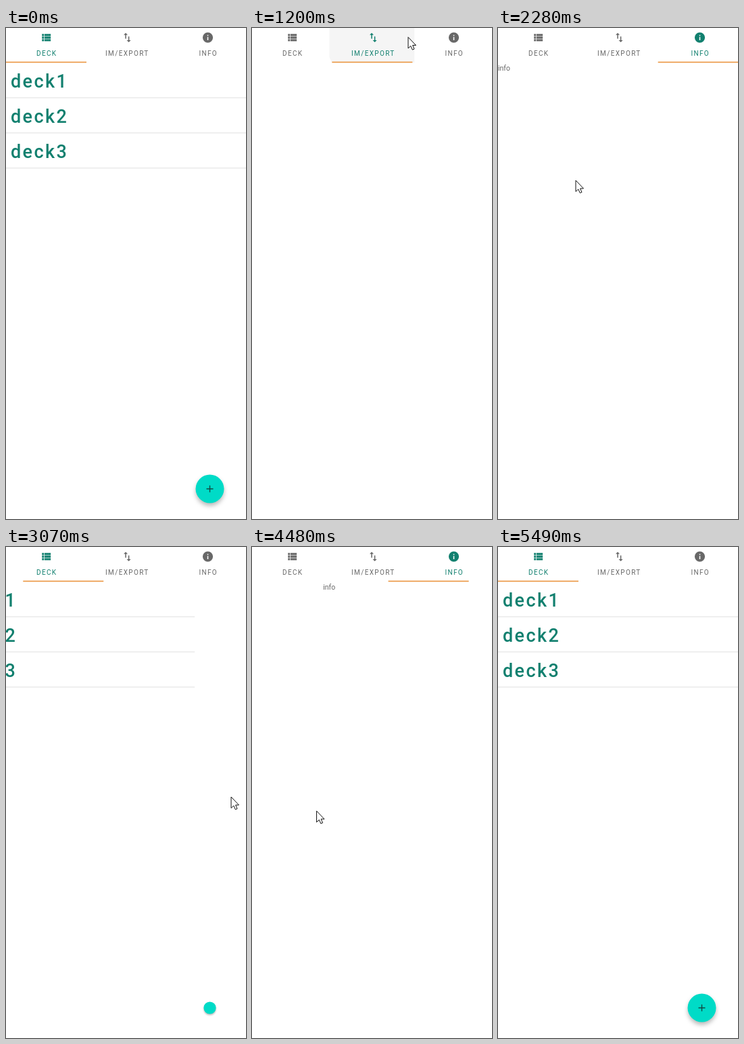
Recreate the animation shown at these times as an HTML page. Size 355x725 px, loop 6.35 s.

```html
<!DOCTYPE html>
<html lang="en">
<head>
<meta charset="utf-8">
<title>Deck tabs</title>
<style>
html, body { margin: 0; width: 100%; height: 100%; overflow: hidden; background: #fff; }
svg { display: block; width: 355px; height: 725px; font-family: Roboto, sans-serif; }
.tab { fill: #686868; font: 400 10px Roboto, sans-serif; letter-spacing: 1.35px; }
.tab.on { fill: #12806f; }
.deck { fill: #12806f; font: 500 27px Roboto, sans-serif; letter-spacing: 2.35px; }
#fab { filter: drop-shadow(0 4px 3px rgba(0, 0, 0, .27)); }
</style>
</head>
<body>
<svg viewBox="0 0 355 725">
  <clipPath id="clip"><rect id="tapped" width="126" height="51"/></clipPath>
  <g clip-path="url(#clip)"><circle id="ripple"/></g>

  <g class="tab">
    <path transform="translate(50.2 5) scale(.76)" d="M4 14h4v-4H4zm0 5h4v-4H4zM4 9h4V5H4zm5 5h12v-4H9zm0 5h12v-4H9zM9 5v4h12V5z"/>
    <text x="45" y="40.5">DECK</text>
  </g>
  <g class="tab">
    <path transform="translate(170.2 5) scale(.76)" d="M9 3L5 7h3v7h2V7h3zm7 14v-7h-2v7h-3l4 4 4-4z"/>
    <text x="147" y="40.5">IM/EXPORT</text>
  </g>
  <g class="tab">
    <path transform="translate(289.4 5) scale(.76)" d="M12 2a10 10 0 100 20 10 10 0 000-20zm1 15h-2v-6h2zm0-8h-2V7h2z"/>
    <text x="285.4" y="40.5">INFO</text>
  </g>

  <rect id="line" y="49.7" width="119" height="1.6" fill="#ea953f"/>

  <g id="pages">
    <g id="decks"></g>
    <text x="710" y="62.5" font-size="10.5" fill="#666">info</text>
  </g>

  <g id="fab">
    <circle r="21" fill="#00dbc7"/>
    <path id="plus" d="M-5 0H5M0-5V5" stroke="#124a43" stroke-width="1.4"/>
  </g>
  <path id="cursor" d="M0 0V16.5L3.8 13 6.3 18.6 9 17.5 6.6 12H11.5Z" fill="#fff" stroke="#111" stroke-linejoin="round"/>
</svg>
<script>
const LOOP = 6350, STEP = 78, WIDTH = 355, TAB = WIDTH / 3, GLIDE = 250;
const $ = id => document.getElementById(id);
const tabs = document.querySelectorAll('g.tab');

$('decks').innerHTML = [1, 2, 3].map(n => {
  const y = 51 + 51.9 * n;
  return `<text class="deck" x="7" y="${y - 15}">deck${n}</text>
    <rect y="${y - .6}" width="${WIDTH}" height="1.4" fill="#e9e9e9"/>`;
}).join('');

// Page changes; those with a tap also show a ripple, the others are swipes.
const moves = [
  { at: 740, ms: 405, from: 0, to: 1, tap: { x: 184, y: 13, speed: .29, alpha: .12 } },
  { at: 1400, ms: 212, from: 1, to: 2, tap: { x: 310, y: 25, speed: .4, alpha: .165 } },
  { at: 2292, ms: 400, from: 2, to: 1 },
  { at: 2860, ms: 302, from: 1, to: 0 },
  { at: 3540, ms: 390, from: 0, to: 1 },
  { at: 4242, ms: 366, from: 1, to: 2 },
  { at: 4890, ms: 600, from: 2, to: 0 }
];

// Cursor stops: arrival time, x, y.
const stops = [
  [0, 317, 725], [240, 244, 357], [420, 171, 8], [576, 187, 10], [1350, 312, 20],
  [1590, 178, 45], [2292, 115, 225], [2448, 277, 260], [2750, 267, 341],
  [2916, 60, 365], [3072, 333, 369], [3800, 60, 385], [4242, 343, 388],
  [4525, 68, 390], [4870, 10, 670], [4950, -20, 680]
];

const ramp = (t, start, ms) => Math.min(1, Math.max(0, (t - start) / ms));
const ease = u => u * u * (3 - 2 * u);
const mix = (a, b, u) => a + (b - a) * u;

function set(id, attrs) {
  for (const name in attrs) $(id).setAttribute(name, attrs[name]);
}

function cursorAt(t) {
  const next = stops.findIndex(s => s[0] > t);
  if (next < 1) return stops[next < 0 ? stops.length - 1 : 0].slice(1);
  const [left, x0, y0] = stops[next - 1], [arrive, x1, y1] = stops[next];
  const start = Math.max(left, arrive - GLIDE);
  const u = ease(ramp(t, start, arrive - start));
  return [mix(x0, x1, u), mix(y0, y1, u)];
}

function drawRipple(tap, age, tab) {
  set('tapped', { x: tab * TAB - 4 });
  set('ripple', {
    cx: tap.x, cy: tap.y, r: Math.min(76, tap.speed * age),
    'fill-opacity': tap.alpha * (1 - ramp(age, 250, 310))
  });
}

function draw(time) {
  // The screen advances in fixed steps.
  const t = Math.max(0, Math.floor((time - 18) / STEP) * STEP + 30);
  const move = moves.filter(m => m.at <= t).pop() || { ...moves[0], tap: null };
  const { tap, at, ms, from, to } = move;
  const page = mix(from, to, ease(ramp(t, at, ms)));

  const selected = tap ? to : Math.round(page);
  tabs.forEach((tab, i) => tab.classList.toggle('on', i === selected));
  set('ripple', { r: 0 });
  if (tap) drawRipple(tap, t - at, to);

  set('pages', { transform: `translate(${-page * WIDTH} 0)` });
  // The underline trails the page when it leaves the first tab by a tap.
  set('line', { x: (tap && page < 1 ? page ** 2 : page) * TAB });

  const grow = start => ramp(t, start, 180);
  const scale = 1 - grow(866) + grow(2994) - grow(3700) + grow(5270);
  set('fab', {
    transform: `translate(301.5 680.5) scale(${scale})`,
    visibility: scale > .01 ? 'visible' : 'hidden'
  });
  set('plus', { opacity: scale > .6 ? 1 : 0 });
  set('cursor', { transform: `translate(${cursorAt(t)})` });
}

const began = performance.now();
function tick() {
  draw((performance.now() - began) % LOOP);
  requestAnimationFrame(tick);
}
tick();
</script>
</body>
</html>
```
